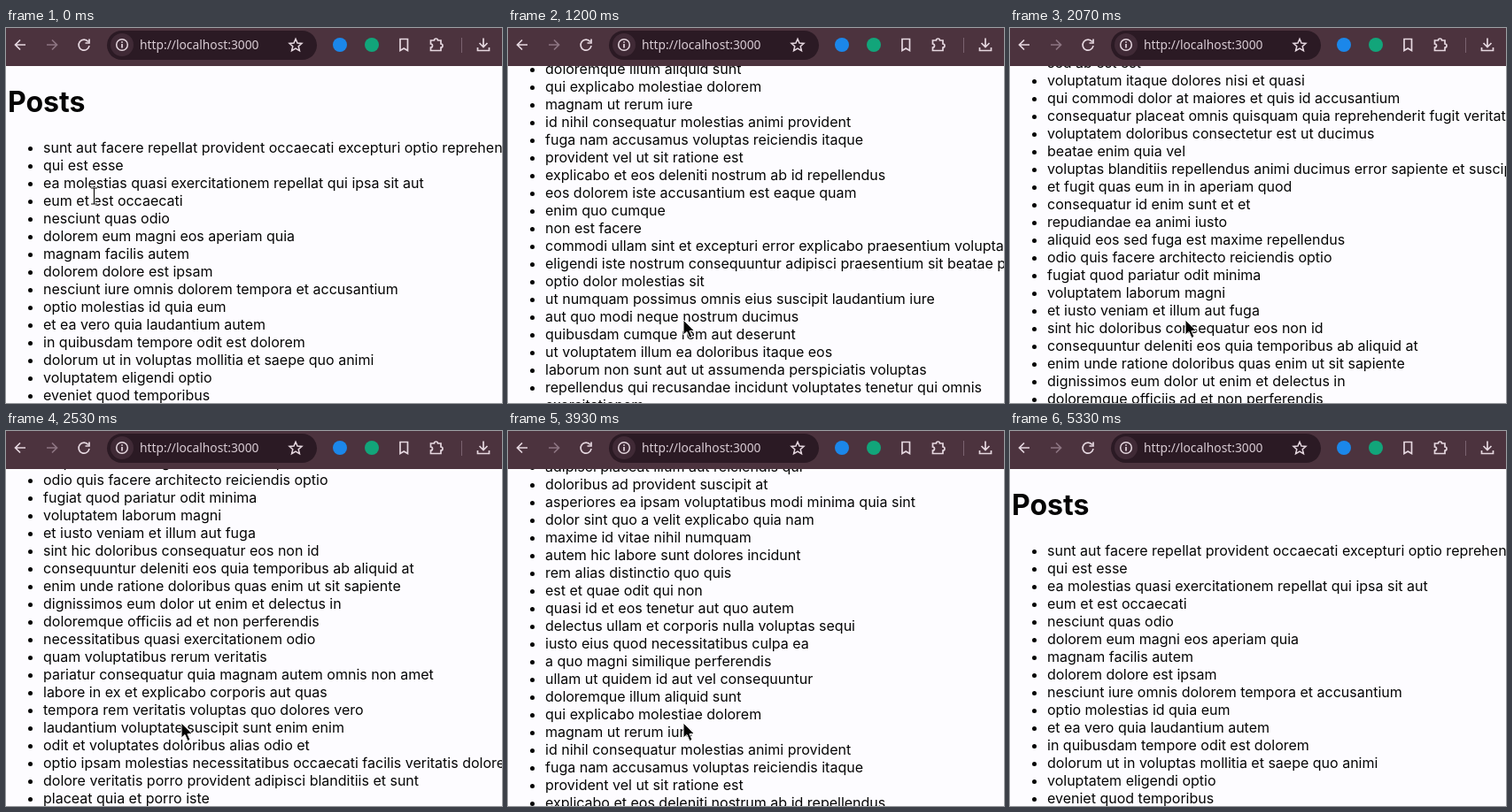
Write an HTML page that moves like this. It is 560 px wide and 424 px high and loops after 7540 ms.

```html
<!DOCTYPE html>
<html lang="en">
<head>
<meta charset="utf-8">
<title>Posts</title>
<style>
  html, body { margin: 0; width: 100%; height: 100%; overflow: hidden; background: #fdfcff; }
  #stage { position: relative; width: 560px; height: 424px; overflow: hidden; background: #fdfcff; }
  #page {
    position: absolute; left: 2px; top: 43px; width: 640px;
    font: 16px Inter, sans-serif; color: #050505; white-space: pre;
  }
  h1 { margin: 0; padding: 21px 0 22px; font-size: 32px; font-weight: 700; }
  ul { margin: 0; padding: 0 0 0 40px; list-style: disc; }
  svg { position: absolute; left: 0; top: 0; }
  #bar text { font: 13.8px "Noto Sans", sans-serif; fill: #d9ccd4; }
  .line { fill: none; stroke: #e6d8e0; stroke-width: 1.7; }
</style>
</head>
<body>
<div id="stage">
  <div id="page"><h1>Posts</h1><ul id="list"></ul></div>

  <svg id="bar" width="560" height="43" viewBox="0 0 560 43">
    <rect width="560" height="43" fill="#4c333e"/>
    <rect x="114" y="3" width="237" height="33" rx="16.5" fill="#2b1a24"/>
    <circle cx="131" cy="19" r="13" fill="#402a36"/>
    <g class="line">
      <path d="M22 19H11M16 13.5L10.500 19L16 24.500"/>
      <path d="M46 19H57M52 13.500L57.500 19L52 24.500" stroke="#8d7582"/>
      <path d="M92.800 15.500A6 6 0 1 0 94 20M94 12.500V17H89.500"/>
      <circle cx="131" cy="19" r="6.300" stroke-width="1.500"/>
      <path d="M131 18V22.500M131 15.200V16.700"/>
      <path d="M327 12.300L329 17L334 17.400L330.200 20.700L331.400 25.600L327 23L322.600 25.600L323.800 20.700L320 17.400L325 17Z" stroke-width="1.500"/>
      <path d="M445 12.500H453.500V25.500L449.200 23L445 25.500Z"/>
      <path d="M479.500 14H483.500A2 2 0 0 1 487.500 14H491V18A2 2 0 0 1 491 22V25.500H479.500V22A2 2 0 0 0 479.500 18Z"/>
      <path d="M539 11.500V21M534.500 17L539 21.500L543.500 17M532.500 22V25.500H545.500V22"/>
    </g>
    <path d="M514.500 11V28" stroke="#7a6270"/>
    <circle cx="377" cy="19" r="8" fill="#1b87ea"/>
    <circle cx="413" cy="19" r="8" fill="#12a57a"/>
    <text x="151" y="24">http://localhost:3000</text>
  </svg>

  <svg id="cursor" width="24" height="28" overflow="visible">
    <g id="beam" fill="none">
      <path d="M-3.500 -9H-1Q0 -9 0 -8V8Q0 9 -1 9H-3.500M3.500 -9H1Q0 -9 0 -8M0 8Q0 9 1 9H3.500" stroke="#fff" stroke-width="2.600"/>
      <path d="M-3.500 -9H-1Q0 -9 0 -8V8Q0 9 -1 9H-3.500M3.500 -9H1Q0 -9 0 -8M0 8Q0 9 1 9H3.500" stroke="#111" stroke-width="1.200"/>
    </g>
    <path id="arrow" d="M0 0V17L4 13.500L7 20.500L10 19.200L7 12.500H12.500Z" fill="#050505" stroke="#fff"/>
  </svg>
</div>

<script>
const titles = `sunt aut facere repellat provident occaecati excepturi optio reprehenderit
qui est esse
ea molestias quasi exercitationem repellat qui ipsa sit aut
eum et est occaecati
nesciunt quas odio
dolorem eum magni eos aperiam quia
magnam facilis autem
dolorem dolore est ipsam
nesciunt iure omnis dolorem tempora et accusantium
optio molestias id quia eum
et ea vero quia laudantium autem
in quibusdam tempore odit est dolorem
dolorum ut in voluptas mollitia et saepe quo animi
voluptatem eligendi optio
eveniet quod temporibus
sint suscipit perspiciatis velit dolorum rerum ipsa laboriosam odio
fugit voluptas sed molestias voluptatem provident
voluptate et itaque vero tempora molestiae
adipisci placeat illum aut reiciendis qui
doloribus ad provident suscipit at
asperiores ea ipsam voluptatibus modi minima quia sint
dolor sint quo a velit explicabo quia nam
maxime id vitae nihil numquam
autem hic labore sunt dolores incidunt
rem alias distinctio quo quis
est et quae odit qui non
quasi id et eos tenetur aut quo autem
delectus ullam et corporis nulla voluptas sequi
iusto eius quod necessitatibus culpa ea
a quo magni similique perferendis
ullam ut quidem id aut vel consequuntur
doloremque illum aliquid sunt
qui explicabo molestiae dolorem
magnam ut rerum iure
id nihil consequatur molestias animi provident
fuga nam accusamus voluptas reiciendis itaque
provident vel ut sit ratione est
explicabo et eos deleniti nostrum ab id repellendus
eos dolorem iste accusantium est eaque quam
enim quo cumque
non est facere
commodi ullam sint et excepturi error explicabo praesentium voluptas
eligendi iste nostrum consequuntur adipisci praesentium sit beatae perferendis
optio dolor molestias sit
ut numquam possimus omnis eius suscipit laudantium iure
aut quo modi neque nostrum ducimus
quibusdam cumque rem aut deserunt
ut voluptatem illum ea doloribus itaque eos
laborum non sunt aut ut assumenda perspiciatis voluptas
repellendus qui recusandae incidunt voluptates tenetur qui omnis|exercitationem
soluta aliquam aperiam consequatur illo quis voluptas
qui enim et consequuntur quia animi quis voluptate quibusdam
ut quo aut ducimus alias
sit asperiores ipsam eveniet odio non quia
sit vel voluptatem et non libero
qui et at rerum necessitatibus
sed ab est est
voluptatum itaque dolores nisi et quasi
qui commodi dolor at maiores et quis id accusantium
consequatur placeat omnis quisquam quia reprehenderit fugit veritatis facere
voluptatem doloribus consectetur est ut ducimus
beatae enim quia vel
voluptas blanditiis repellendus animi ducimus error sapiente et suscipit
et fugit quas eum in in aperiam quod
consequatur id enim sunt et et
repudiandae ea animi iusto
aliquid eos sed fuga est maxime repellendus
odio quis facere architecto reiciendis optio
fugiat quod pariatur odit minima
voluptatem laborum magni
et iusto veniam et illum aut fuga
sint hic doloribus consequatur eos non id
consequuntur deleniti eos quia temporibus ab aliquid at
enim unde ratione doloribus quas enim ut sit sapiente
dignissimos eum dolor ut enim et delectus in
doloremque officiis ad et non perferendis
necessitatibus quasi exercitationem odio
quam voluptatibus rerum veritatis
pariatur consequatur quia magnam autem omnis non amet
labore in ex et explicabo corporis aut quas
tempora rem veritatis voluptas quo dolores vero
laudantium voluptate suscipit sunt enim enim
odit et voluptates doloribus alias odio et
optio ipsam molestias necessitatibus occaecati facilis veritatis dolores aut
dolore veritatis porro provident adipisci blanditiis et sunt
placeat quia et porro iste
nostrum quis quasi placeat`.split("\n");

const LOOP = 7540, TICK = 200 / 3, TOP = 43;
const $ = id => document.getElementById(id);
const page = $("page"), cursor = $("cursor"), beam = $("beam"), arrow = $("arrow");

for (const title of titles) {
  const li = document.createElement("li");
  li.textContent = title.replace("|", "\n");
  $("list").append(li);
}

// Rows of [ms, value, ...]
const scroll = [[0, 0], [170, 0], [330, 80], [800, 478], [1600, 940], [2330, 1400], [2470, 1440],
  [3070, 1440], [3200, 1385], [3330, 1240], [3930, 455], [4270, 50], [4400, 0]];
const pointer = [[0, 99.5, 190], [70, 110, 205], [270, 188, 316], [400, 198, 330],
  [4870, 198, 330], [5000, 225, 270], [5300, 390, -30]];

function at(track, t) {
  const i = track.findIndex(row => row[0] > t);
  if (i < 0) return track[track.length - 1].slice(1);
  const a = track[i - 1], b = track[i];
  const k = (t - a[0]) / (b[0] - a[0]);
  return a.slice(1).map((v, n) => v + (b[n + 1] - v) * k);
}

function snap(ms) {
  const tick = Math.floor((ms + 3.4) / TICK);
  return Math.round(tick * TICK / 10) * 10;
}

function draw(now) {
  const t = snap(now % LOOP);
  const [y] = at(scroll, t);
  const [cx, cy] = at(pointer, t);
  const isBeam = t < 200;
  page.style.top = `${TOP - Math.round(y)}px`;
  cursor.style.transform = `translate(${cx}px, ${cy}px)`;
  cursor.style.display = t > 5320 ? "none" : "block";
  beam.style.display = isBeam ? "inline" : "none";
  arrow.style.display = isBeam ? "none" : "inline";
}

const start = performance.now();
function loop() {
  draw(performance.now() - start);
  requestAnimationFrame(loop);
}
loop();
</script>
</body>
</html>
```
